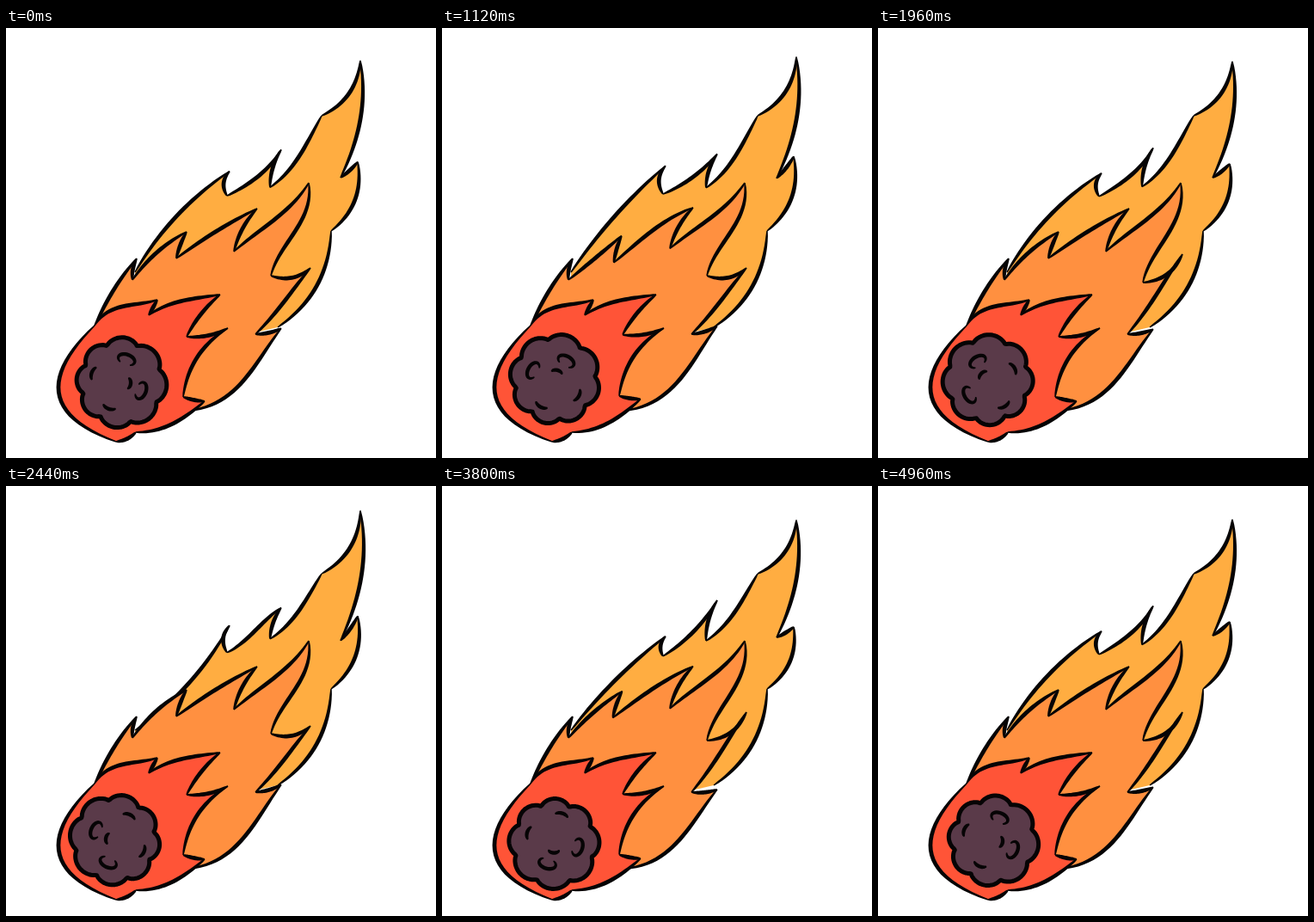
Write an HTML page with a canvas that moves like this. It is 500 px wide and 500 px high and loops after 5000 ms.

```html
<!DOCTYPE html>
<html lang="en">
<head>
<meta charset="utf-8">
<title>Meteor</title>
<style>
  html, body { margin: 0; width: 100%; height: 100%; overflow: hidden; background: #fff; }
  canvas { display: block; width: 500px; height: 500px; }
</style>
</head>
<body>
<canvas id="stage" width="500" height="500"></canvas>
<script>
const ctx = document.getElementById('stage').getContext('2d');
const LOOP = 5000, STEP = 40, FLICKER = 1000, TAU = Math.PI * 2;
const INK = '#060405', YELLOW = '#ffad41', ORANGE = '#ff9040', RED = '#ff5437', STONE = '#5a3a49';

function fill(pts, color) {
  ctx.beginPath();
  pts.forEach(p => ctx.lineTo(p[0], p[1]));
  ctx.closePath();
  ctx.fillStyle = color;
  ctx.fill();
}

// Sample a curve given as a function of u from 0 to 1
const sample = (fn, n = 24) => Array.from({ length: n + 1 }, (_, i) => fn(i / n));

// Cubic edge whose handles sit at the thirds, pushed sideways by a share of its length
function edge([x0, y0], [x1, y1, bend = 0, bend2 = bend]) {
  const dx = x1 - x0, dy = y1 - y0;
  return sample(u => {
    const off = 3 * u * (1 - u) * (bend * (1 - u) + bend2 * u);
    return [x0 + dx * u - dy * off, y0 + dy * u + dx * off];
  });
}

// Ink line that swells in the middle and thins out at its ends
function brush(line, width) {
  const left = [], right = [], last = line.length - 1;
  line.forEach(([x, y], i) => {
    const a = line[Math.max(0, i - 1)], b = line[Math.min(last, i + 1)];
    const dx = b[0] - a[0], dy = b[1] - a[1], len = Math.hypot(dx, dy) || 1;
    const h = width / 2 * (0.3 + 0.7 * Math.sin(Math.PI * i / last) ** 0.6);
    left.push([x - dy / len * h, y + dx / len * h]);
    right.unshift([x + dy / len * h, y - dx / len * h]);
  });
  fill(left.concat(right), INK);
}

// Tips and notches are [x, y, bend, bend2]; the hidden points only close the fill
function flame(color, keys, hidden = []) {
  const lines = keys.slice(1).map((k, i) => edge(keys[i], k));
  fill(lines.flat().concat(hidden), color);
  lines.forEach(l => brush(l, 4.8));
}

function flames(t) {
  const wave = peak => Math.cos(TAU * (t - peak));
  const side = wave(0.76), mid = wave(0.22), tail = wave(0.36), bulge = wave(0.46);
  const lick = Math.max(0, Math.cos(2 * TAU * (t - 0.2))) ** 2;
  const flip = Math.max(-1, Math.min(1, 8 * Math.sin(TAU * (t + 0.02))));

  flame(YELLOW, [
    [150, 284],
    [260, 166 + 9 * side, 0.08 * bulge],
    [257, 195 + 3 * side, 0.25],
    [320, 140 + 8 * mid, 0.08, 0.04 - 0.08 * bulge],
    [307, 181 + 5 * wave(0.08), 0.1],
    [367, 102, 0.12, 0.04],
    [412, 34 - 6 * tail, 0.19],
    [389, 177 - 3 * wave(0), -0.12, -0.1],
    [409, 155 + 9 * side, 0.05],
    [378, 236, -0.2],
    [316, 348, -0.17]
  ], [[290, 354], [150, 310]]);

  flame(ORANGE, [
    [100, 356],
    [152, 268, -0.06],
    [147, 293, 0.1],
    [210 - 4 * lick, 237 + 16 * lick, 0.3 * lick - 0.08],
    [198 + 6 * lick, 268 + 17 * lick, 0.05],
    [292, 210 - 4 * lick, -0.03, -0.03 - 0.2 * lick],
    [265, 260 - 12 * lick, 0.09],
    [352, 180, 0, 0.1],
    [308, 292 - 4 * flip, -0.2, 0.05],
    [354, 271 + 8 * flip, 0.2],
    [290, 356, 0, -0.04],
    [320, 349 + 4 * side, 0.08],
    [212, 445, -0.06, -0.24]
  ], [[150, 420]]);

  flame(RED, [
    [103, 346],
    [128, 481, 0.5, 0.57],
    [151, 470, 0.13],
    [231, 434 - 9 * lick, 0.16, 0.1],
    [206, 429 - 4 * lick, -0.05],
    [258, 349, -0.16],
    [210, 359 - 8 * lick, -0.1],
    [249, 310, -0.07],
    [166, 334, 0.04, 0.12],
    [176, 316],
    [103, 346, 0.02, 0.25]
  ]);
}

// Open ring facing away from the middle of the stone
function crater(angle, dist, size, sweep) {
  ctx.save();
  ctx.rotate(angle);
  brush(sample(u => {
    const a = (u - 0.5) * sweep;
    return [dist + size * 0.6 * Math.cos(a), size * Math.sin(a)];
  }), 4.4);
  ctx.restore();
}

function stone(turn) {
  ctx.save();
  ctx.translate(130.5, 412);
  ctx.rotate(-turn * TAU);
  // Eight lobes, a little larger on one side
  fill(sample(u => {
    const a = u * TAU;
    const r = 45.5 + 7 * Math.abs(Math.cos(4 * (a - 0.09))) ** 0.7 + 4 * Math.cos(a - 0.1);
    return [r * Math.cos(a), r * Math.sin(a)];
  }, 160), STONE);
  ctx.lineWidth = 5;
  ctx.lineJoin = 'round';
  ctx.strokeStyle = INK;
  ctx.stroke();

  for (let i = 0; i < 4; i++) {
    const wide = i % 3 === 0;
    crater(0.35 + i * TAU / 4, 28, wide ? 10 : 8, TAU * (wide ? 0.8 : 0.4));
  }
  crater(0.1, 11, 6, TAU / 2);
  ctx.restore();
}

function frame(now) {
  const t = Math.floor((now % LOOP) / STEP) * STEP;
  ctx.fillStyle = '#fff';
  ctx.fillRect(0, 0, 500, 500);
  flames((t % FLICKER) / FLICKER);
  stone(t / LOOP);
}

let begin;
function tick(now) {
  begin ??= now;
  frame(now - begin);
  requestAnimationFrame(tick);
}
frame(0);
requestAnimationFrame(tick);
</script>
</body>
</html>
```
